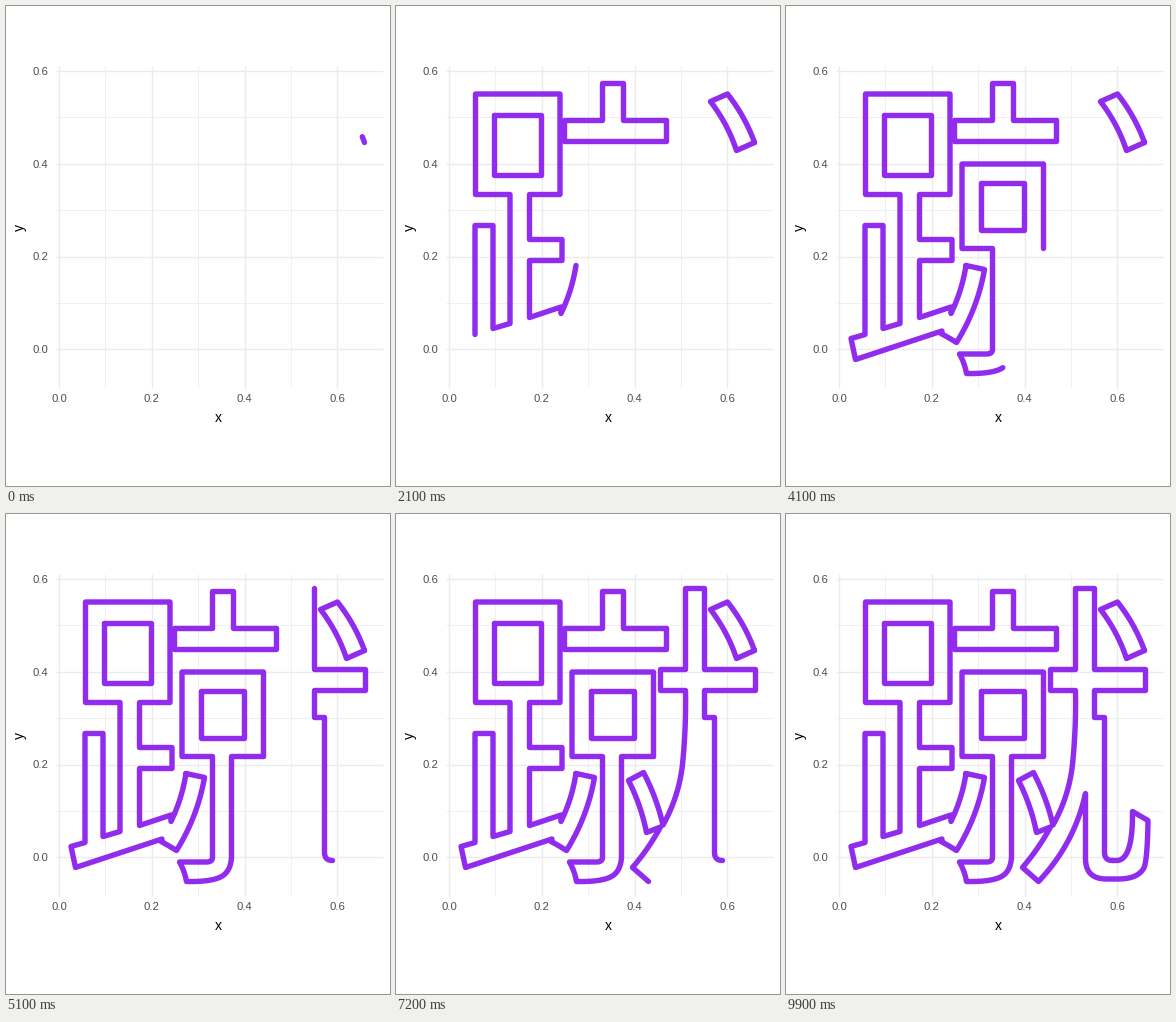
A matplotlib script that plays this animation: 384 by 480 pixels, repeating every 10 s.

```python
import numpy as np
import matplotlib.pyplot as plt
from matplotlib.animation import FuncAnimation

W, H, DPI = 384, 480, 72
FRAMES, INTERVAL = 100, 100
RATE = 20 / 7  # outline points revealed per frame
INK, GRID, LABEL = "#912CEE", "#EBEBEB", "#4D4D4D"
SCALE, X0, Y0 = 464.0, 53.0, 343.3


class Pen:
    """Collects the points of one closed outline."""

    def __init__(self, x, y):
        self.pts = [(x, y)]

    def to(self, x, y):
        self.pts.append((x, y))
        return self

    def h(self, x):
        return self.to(x, self.pts[-1][1])

    def v(self, y):
        return self.to(self.pts[-1][0], y)

    def vh(self, *stops):
        for i, s in enumerate(stops):
            self.h(s) if i % 2 else self.v(s)
        return self

    def curve(self, cx, cy, x, y, n=12):
        ax, ay = self.pts[-1]
        for t in np.arange(1, n + 1) / n:
            a, b, c = (1 - t) ** 2, 2 * t * (1 - t), t * t
            self.to(a * ax + b * cx + c * x, a * ay + b * cy + c * y)
        return self

    def bow(self, x, y, k, n=12):
        """Arc whose control point sits k chord lengths off the middle."""
        ax, ay = self.pts[-1]
        dx, dy = x - ax, y - ay
        return self.curve(ax + dx / 2 + k * dy, ay + dy / 2 - k * dx, x, y, n)

    def close(self):
        return np.array(self.pts + self.pts[:1]) + 0.5


def box(left, top, right, bottom):
    return Pen(left, top).h(right).v(bottom).h(left).close()


dot = Pen(358, 136).bow(331, 87.5, -0.082, 9).to(314, 95)
dot.bow(340, 144, 0.085)

lid = Pen(269, 113).h(226).vh(76, 205, 113, 167, 134, 269)

foot = Pen(179.5, 259).bow(164.5, 307, 0.075, 6).v(300.5).to(133, 311)
foot.vh(254, 165.5, 233, 133, 188, 163.5, 87.5, 79, 188, 113.5, 317)
foot.to(96.5, 322).vh(219, 78.5, 328).to(64.5, 332).to(69, 353)
foot.to(155.5, 324.5).to(154.5, 327).bow(170, 336, 0.02, 5)
foot.bow(198, 263, -0.097)

hook = Pen(257, 242).vh(157.5, 175.5, 242, 206, 343)
hook.curve(206, 347.5, 200, 347.5, 5).h(173).bow(180, 367, 0.088, 5)
hook.curve(205, 367.5, 215, 362).curve(224, 357, 225, 343, 13).v(242)

spear = Pen(326, 346).curve(318, 346, 318, 338, 7)
spear.vh(203, 308, 176, 359, 155, 308, 74, 289, 155, 264, 176, 289)
spear.bow(286.3, 247, 0.029, 6).bow(266.5, 310.5, 0.106)
spear.bow(247, 258, -0.064).to(232, 266).bow(250, 318, 0.069, 14)
spear.to(264, 312.5).bow(236, 353, 0.053, 8).to(252, 367)
spear.bow(299, 279, -0.139, 16).v(344).curve(299, 364.5, 320, 364.5)
spear.h(333).curve(353, 364, 358, 352, 15).curve(361, 342, 361.5, 306)
spear.to(346, 297).curve(346.5, 346, 330, 346, 18)

paths = [dot.close(), lid.close(), box(97.5, 108.5, 144, 168), foot.close(),
         box(194, 176, 237, 223.5), hook.close(), spear.close()]
starts = np.cumsum([0] + [len(p) for p in paths[:-1]])

fig = plt.figure(figsize=(W / DPI, H / DPI), dpi=DPI, facecolor="white")
ax = fig.add_axes([0, 0, 1, 1])
ax.set_xlim(0, W)
ax.set_ylim(H, 0)
ax.axis("off")


def label(x, y, text, size, color, **kw):
    ax.text(x, y, text, size=size, color=color, family="Liberation Sans",
            va="baseline", rotation_mode="anchor", **kw)


for i in range(7):
    lw = 0.7 if i % 2 else 1.36
    x, y = X0 + SCALE * i / 10, Y0 - SCALE * i / 10
    ax.plot([x, x], [60, 381.5], color=GRID, lw=lw, solid_capstyle="butt")
    ax.plot([49.5, 377], [y, y], color=GRID, lw=lw, solid_capstyle="butt")
    if i % 2 == 0:
        label(x, 396, f"{i / 10:.1f}", 11.2, LABEL, ha="center")
        label(42.5, y + 4, f"{i / 10:.1f}", 11.2, LABEL, ha="right")
label(212.5, 416, "x", 14, "black", ha="center")
label(18, 221.5, "y", 14, "black", ha="center", rotation=90)

lines = [ax.plot([], [], color=INK, lw=5.4, solid_capstyle="round",
                 solid_joinstyle="round", zorder=3)[0] for _ in paths]


def draw(frame):
    shown = round(2 + RATE * frame)
    for line, path, start in zip(lines, paths, starts):
        part = path[:max(0, shown - start)]
        line.set_data(part[:, 0], part[:, 1])
    return lines


anim = FuncAnimation(fig, draw, frames=FRAMES, interval=INTERVAL,
                     init_func=lambda: draw(0), repeat=True, repeat_delay=0)
plt.show()
```
